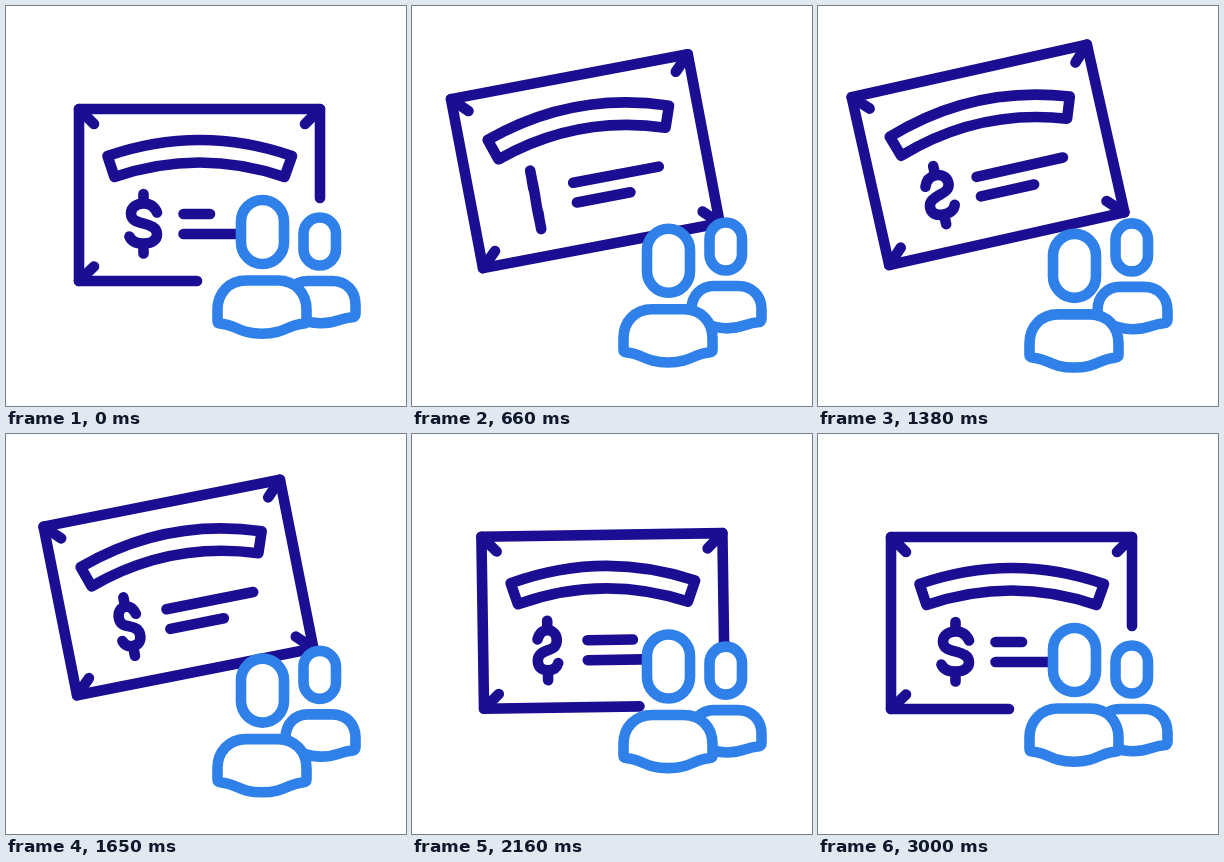
An HTML page for the animation above (3.53 s loop, 400 by 400 pixels).

```html
<!DOCTYPE html>
<html lang="en">
<head>
<meta charset="utf-8">
<title>Certificate and people</title>
<style>
  html, body { margin: 0; width: 100%; height: 100%; overflow: hidden; background: #fff; }
  svg { display: block; width: 100%; height: 100%; }
  g { stroke-width: 10.6; stroke-linecap: round; stroke-linejoin: round; }
  .ink { fill: none; stroke: #1b0e92; }
  .person { fill: #fff; stroke: #2f80e9; }
  #dollar { vector-effect: non-scaling-stroke; }
</style>
</head>
<body>
<svg viewBox="0 0 400 400">
  <g class="ink" id="card">
    <path id="border"/>
    <path d="M73 103L88 118M314 103L299 118M73 275L88 260.5"/>
    <path id="corner"/>
    <path d="M101.5 150Q194 118 286 150L278.5 171Q193.5 142 108.5 171Z"/>
    <path id="dollar" d="M13.5 -11C11 -17 6 -20 0 -20C-7 -20 -12.5 -16 -12.5 -10C-12.5 -3 -6 -1.5 0 0C7 2 13.5 4 13.5 10.5C13.5 17 8 20 0 20C-7 20 -12 18 -14 13M0 -29.5V-20M0 20V30"/>
    <path id="lines"/>
  </g>
  <g class="person" id="back">
    <rect x="297.5" y="211.5" width="32.5" height="48" rx="16.25"/>
    <path d="M279.5 311V298.5C279.5 284.500 289 275 302 275H326C340 275 349.5 284.500 349.5 298.500V308Q349.5 311 346 311.300C334 312 331 317.300 315 317.300S294 311 279.5 311Z"/>
  </g>
  <g class="person" id="front">
    <rect x="235" y="194" width="43" height="64" rx="21.5"/>
    <path d="M211.5 315V303.5C211.5 287 223 274.5 240 274.5H272C289 274.5 300.5 287 300.5 303.5V315Q300.5 317.500 297 317.800C281 319 279 327.700 256 327.700S231 319 215 317.800Q211.5 317.500 211.5 315Z"/>
  </g>
</svg>
<script>
const LOOP = 3530, STEP = 30, END = 3000;
const LIFT_END = 1080, FALL_START = 1120, FALL_END = 2235;
const $ = id => document.getElementById(id);
const move = (id, transform) => $(id).setAttribute('transform', transform);
const shape = (id, d) => $(id).setAttribute('d', d);

// Progress 0..1 between two times; a softens the start, b softens the end.
function ease(t, from, to, a, b) {
  const u = Math.min(1, Math.max(0, (t - from) / (to - from)));
  return 1 - (1 - u ** a) ** b;
}

const hump = (t, from, to) => Math.sin(Math.PI * ease(t, from, to, 1, 1));

function draw(t) {
  const fall = ease(t, FALL_START, FALL_END, 3, 1);
  const lift = ease(t, 0, LIFT_END, 1.6, 3) - fall;
  const overshoot = fall * (1 - ease(t, FALL_END, END, 2, 2));
  const reveal = ease(t, 0, LIFT_END, 1, 4) - ease(t, 1577, FALL_END, 3, 1);
  const turn = 6 * Math.PI * ease(t, 0, END, 1.07, 1.3);
  const sway = hump(t, 0, 900) + hump(t, 1400, 2700);
  const tilt = 12.8 * lift - 1.9 * overshoot;

  move('card', `translate(${-sway} ${0.9 * sway}) rotate(${-tilt} 0 275)`);
  move('front', `translate(0 ${34.3 * lift})`);
  move('back', `translate(0 ${6 * lift})`);

  const width = Math.cos(turn);
  const squash = Math.abs(width) < 0.01 ? 0.01 : width;
  move('dollar', `translate(137.5 217.5) scale(${squash} 1)`);

  const reach = 15 * reveal;
  shape('border', `M${191 + 123 * reveal} 275H73V103H314V${192 + 83 * reveal}`);
  shape('corner', reveal > 0.5 ? `M314 275l${-reach} ${-reach}` : '');
  shape('lines', `M177.5 208H${204 + 62 * reveal}M177.5 228H232`);
}

function tick() {
  const t = performance.now() % LOOP;
  draw(Math.min(END, Math.floor(t / STEP) * STEP));
  requestAnimationFrame(tick);
}
tick();
</script>
</body>
</html>
```
